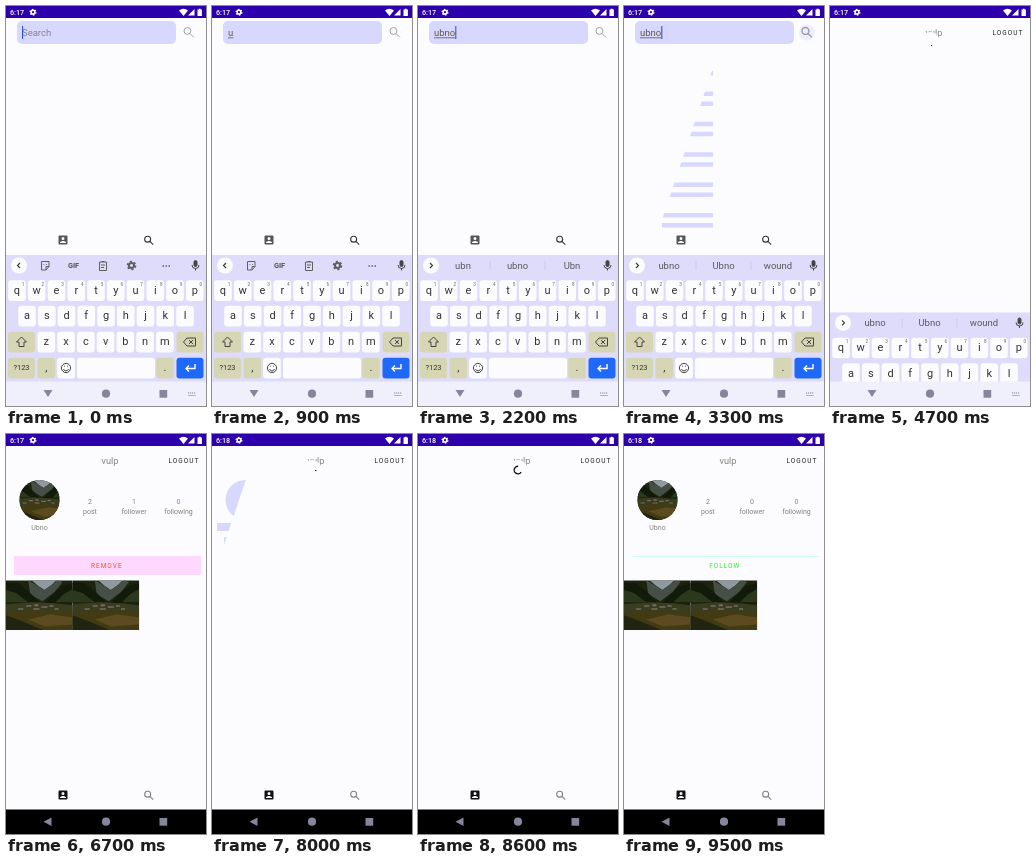
An HTML page for the animation above (9.6 s loop, 200 by 400 pixels).

```html
<!DOCTYPE html>
<html lang="en">
<head>
<meta charset="utf-8">
<title>Profile search</title>
<style>
  html, body { margin: 0; width: 100%; height: 100%; overflow: hidden; background: #fcfcff; }
  svg { display: block; width: 100%; height: 100%; }
  text { font-family: Roboto, "Noto Sans", sans-serif; }
  .mid { text-anchor: middle; }
  .info { font-size: 7px; fill: #85837c; text-anchor: middle; }
  .caps { font-size: 6.5px; letter-spacing: 1px; }
  .key { font-size: 11px; fill: #333; text-anchor: middle; }
  .digit { font-size: 4.6px; fill: #666; text-anchor: middle; }
  .word { font-size: 9.5px; fill: #5c5860; text-anchor: middle; }
  .line { fill: none; stroke: currentColor; }
</style>
</head>
<body>
<svg viewBox="0 0 200 400" preserveAspectRatio="none">
  <defs>
    <symbol id="lens" viewBox="0 0 24 24">
      <circle class="line" cx="9.5" cy="9.5" r="5.5"/><path class="line" d="M13.7 13.7l6 6"/>
    </symbol>
    <symbol id="account" viewBox="0 0 24 24">
      <path fill="currentColor" fill-rule="evenodd" d="M3 5a2 2 0 0 1 2-2h14a2 2 0 0 1 2 2v14a2 2 0 0 1-2 2H5a2 2 0 0 1-2-2zM15 9a3 3 0 1 0-6 0 3 3 0 0 0 6 0zM6 17v1h12v-1c0-2-4-3.1-6-3.1S6 15 6 17z"/>
    </symbol>
    <symbol id="gear" viewBox="0 0 24 24">
      <circle cx="12" cy="12" r="8.5" fill="none" stroke="currentColor" stroke-width="4" stroke-dasharray="4.45"/>
      <circle cx="12" cy="12" r="5.5" fill="none" stroke="currentColor" stroke-width="4.5"/>
    </symbol>
    <symbol id="photo" viewBox="0 0 66 50" preserveAspectRatio="xMidYMid slice">
      <path fill="#1c2410" d="M0 0h66v50H0z"/>
      <path fill="#9098a0" d="M25 0h25l-5 5-7 5-6-4z"/>
      <path fill="#454f45" d="M22 0l8 5 8 5 7-5 6-5 5 2-8 10-12 9-12-7z"/>
      <path fill="#121a0a" d="M0 2l12 1 12 10 9 9H0zM66 3l-11 3-10 9-7 8h28z"/>
      <path fill="#2c381c" d="M0 10l10 3 12 9H0zM66 9l-9 5-8 8h17z"/>
      <path fill="#3a3c20" d="M0 24l26-2 22 1 18 2v8H0z"/>
      <path fill="#766c60" d="M20 25h5v1.500h-5zM28 24h4v2h-4zM35 26h6v1.500h-6zM43 25h4v1.500h-4zM12 28h5v1.500h-5zM27 28h6v1.500h-6zM48 28h4v1.500h-4z"/>
      <path fill="#413a12" d="M0 33l24-3 42 2v18H0z"/>
      <path fill="#5c4a20" d="M22 39l22-5 22 3v7l-28 2z"/>
      <path fill="#202410" d="M0 35l14 5 24 10H0z"/>
    </symbol>
    <clipPath id="disc"><circle cx="33.5" cy="66" r="20"/></clipPath>
    <clipPath id="dot"><circle cx="22" cy="62" r="10"/></clipPath>
    <clipPath id="listShapes"></clipPath>
    <clipPath id="profileShapes"></clipPath>
  </defs>

  <rect width="200" height="400" fill="#fcfcff"/>

  <g id="searchPage">
    <rect x="11" y="15" width="159" height="23" rx="5" fill="#d8d8ff"/>
    <text id="hint" x="16" y="30" font-size="9.5" fill="#85838c">Search</text>
    <text id="query" x="16" y="30" font-size="9.5" fill="#605a48"></text>
    <path id="underline" stroke="#605a48" stroke-width=".8"/>
    <rect id="caret" y="20" width="1.1" height="13" fill="#3050e8"/>
    <circle id="tapGlow" cx="183" cy="26.5" r="8" fill="#e8e8ff"/>
    <use id="lensButton" href="#lens" x="175.5" y="19" width="15" height="15" color="#a0a0a8"/>
    <g clip-path="url(#listShapes)"><path class="band" fill="#d8d8ff"/></g>
    <g id="result">
      <g clip-path="url(#dot)"><use href="#photo" x="9" y="52" width="26" height="20"/></g>
      <text x="39" y="60" font-size="7" fill="#444">vulp</text>
      <text x="39" y="70" font-size="7" fill="#77746c">Ubno</text>
    </g>
  </g>

  <g id="profilePage">
    <text class="mid" x="104" y="30" font-size="9.2" fill="#85837c">vulp</text>
    <text class="caps" x="162.5" y="29.2" fill="#222">LOGOUT</text>
    <g clip-path="url(#profileShapes)"><path class="band" fill="#d8d8ff"/></g>
    <g id="spinner">
      <circle cx="100" cy="36" r="10" fill="#fcfcff"/>
      <circle id="arc" cx="100" cy="36" r="3.8" fill="none" stroke="#111" stroke-width="1.4" pathLength="360"/>
    </g>
    <g id="profile">
      <g clip-path="url(#disc)"><use href="#photo" x="7" y="46" width="53" height="40"/></g>
      <text class="info" x="33.5" y="95.7">Ubno</text>
      <text class="info" x="84" y="70">2</text><text class="info" x="84" y="79.5">post</text>
      <text class="info" id="followers" x="128" y="70"></text><text class="info" x="128" y="79.5">follower</text>
      <text class="info" x="172.5" y="70">0</text><text class="info" x="172.5" y="79.5">following</text>
      <path id="border" d="M8 122.5h187" stroke-width=".8"/>
      <rect id="press" x="8" y="122" width="187" height="19" rx="1" fill="#ffd8ff"/>
      <text class="caps mid" id="action" x="100.8" y="134"></text>
      <use href="#photo" x="0" y="146.5" width="66.7" height="49.5"/>
      <use href="#photo" x="66.5" y="146.5" width="66.7" height="49.5"/>
    </g>
  </g>

  <g id="tabs">
    <use id="accountTab" href="#account" x="51" y="355" width="12" height="12"/>
    <use id="lensTab" href="#lens" x="136.5" y="355" width="13" height="13" stroke-width="2"/>
  </g>

  <g id="keyboard">
    <rect y="249" width="200" height="128" fill="#dedcfa"/>
    <circle cx="13" cy="259.5" r="8" fill="#fcfcff"/>
    <path id="chevron" fill="none" stroke="#333" stroke-width="1.1"/>
    <g id="tools" color="#606060" fill="none" stroke="#606060">
      <path d="M35.5 255.5h7.5v5l-3 3.5h-4.5zM43 260.5h-3v3.5M37.5 258.5h.8M40.2 258.5h.8"/>
      <text class="mid" x="67.5" y="262.4" font-size="7.3" font-weight="700" fill="#505050" stroke="none">GIF</text>
      <path d="M93.5 256h7v8.5h-7zM95.5 255.5h3M95 259h4M95 261.5h3"/>
      <use href="#gear" x="120" y="254" width="11" height="11" stroke="none"/>
      <path d="M156.500 260h1.5m1.5 0H161m1.5 0H164" stroke-width="1.6"/>
    </g>
    <g id="words">
      <text class="word" x="45" y="263"></text><text class="word" x="99.5" y="263"></text><text class="word" x="154" y="263"></text>
      <path d="M72 255v9M127 255v9" stroke="#c4c4e4" stroke-width=".7"/>
    </g>
    <g fill="none" stroke="#444">
      <rect x="188" y="254.5" width="3" height="6" rx="1.5" fill="#444"/>
      <path d="M186 259a3.5 3.5 0 0 0 7 0M189.5 262.5v2"/>
    </g>
    <g id="keys"></g>
    <g fill="none" stroke="#444">
      <path d="M15.5 331l5 5h-2.5v4.5h-5V336h-2.5z"/>
      <path d="M181 332h8.5v8H181l-3.5-4zM183 334l4 4m0-4l-4 4"/>
      <circle cx="60" cy="362" r="4.6"/><path d="M57.5 363a2.6 2.6 0 0 0 5 0M58 360.2h.9M61.1 360.2h.9"/>
      <path d="M189 358v4.5h-9m3-3l-3 3 3 3" stroke="#fff" stroke-width="1.4"/>
    </g>
  </g>

  <g fill="#85859c">
    <rect id="navBar" y="375.5" width="200" height="24.5"/>
    <path id="back"/>
    <circle cx="100" cy="387.7" r="4.1"/><rect x="153.5" y="384" width="7.7" height="7.7"/>
    <path id="switcher" d="M182 387h8M182.5 389.5h7" stroke="#85859c" stroke-width="1.2" stroke-dasharray="1.2 .8"/>
  </g>

  <g fill="#fff" color="#fff">
    <rect width="200" height="12" fill="#2d00ac"/>
    <text id="clock" x="4" y="9" font-size="7.2" font-weight="500"></text>
    <use href="#gear" x="23" y="2.2" width="8" height="8"/>
    <path d="M173 4.5q4.5-3.5 9 0l-4.5 5.5zM182 9.5h6.5V3zM191.5 3.5h1.2v-.8h2v.8h1.2v6.5h-4.4z"/>
  </g>
</svg>
<script>
const LOOP = 9600;
const $ = id => document.getElementById(id);
const clamp = v => Math.max(0, Math.min(1, v));
const ramp = (t, from, to) => clamp((t - from) / (to - from));
const show = (id, on) => { $(id).style.display = on ? '' : 'none'; };
const write = (id, text) => { if ($(id).textContent !== text) $(id).textContent = text; };
const set = (id, attrs) => { for (const k in attrs) $(id).setAttribute(k, attrs[k]); };

function add(parent, tag, attrs, text = '') {
  const el = document.createElementNS('http://www.w3.org/2000/svg', tag);
  for (const k in attrs) el.setAttribute(k, attrs[k]);
  el.textContent = text;
  parent.append(el);
}
const bar = (id, x, y, width, height) => add($(id), 'rect', { x, y, width, height });

// Loading placeholders
for (let i = 0; i < 6; i++) {
  const y = 55 + i * 30.4;
  add($('listShapes'), 'circle', { cx: 22, cy: y + 7, r: 10 });
  bar('listShapes', 38, y, 51, 4.5);
  bar('listShapes', 38, y + 10, 51, 4.5);
}
add($('profileShapes'), 'circle', { cx: 33.5, cy: 66, r: 20 });
bar('profileShapes', 5, 89, 57, 8);
for (const x of [64, 108, 152]) bar('profileShapes', x, 62, 43, 20);
bar('profileShapes', 12, 103, 177, 14);
bar('profileShapes', 8, 122, 187, 19);

// Keyboard
const PALE = '#fcfcff', TAN = '#d6d6b4', PITCH = 19.75;
function key(cx, cy, label = '', width = 17.6, fill = PALE, size = 11) {
  add($('keys'), 'rect', { x: cx - width / 2, y: cy - 9.7, width, height: 20.6, rx: 3, fill });
  add($('keys'), 'text', { class: 'key', x: cx, y: cy + size * .34, style: `font-size:${size}px` }, label);
}
[['qwertyuiop', 11, 284], ['asdfghjkl', 21, 309.5], ['zxcvbnm', 40.3, 335.5]].forEach(([row, x, y]) =>
  [...row].forEach((c, i) => key(x + i * PITCH, y, c)));
[...'1234567890'].forEach((c, i) => add($('keys'), 'text', { class: 'digit', x: 17 + i * PITCH, y: 279.5 }, c));
key(15.5, 335.5, '', 27, TAN);
key(184, 335.5, '', 27, TAN);
key(15.5, 361.5, '?123', 27, TAN, 7.5);
key(40.3, 361.5, ',', 17.6, TAN);
key(60, 361.5);
key(110, 361.5, '', 78);
key(159, 361.5, '.', 17.6, TAN);
key(184, 361.5, '', 27, '#2068f8');

const TYPING = [[0, ''], [900, 'u'], [1300, 'ub'], [1700, 'ubn'], [2150, 'ubno']];
const HINTS = [[0], [1000, 'u', 'up', 'us'], [1400, 'ub', 'up', 'Ub'],
  [1800, 'ubn', 'ubno', 'Ubn'], [2300, 'ubno', 'Ubno', 'wound']];
const latest = (steps, t) => steps.filter(s => s[0] <= t).pop();

// Each load lasts one sweep of the slanted shimmer
const LOADS = [2820, 4711, 7750], SWEEP = 1000, SLANT = .335;
const OPEN = 4700;

function drawShimmer(t) {
  const start = LOADS.find(s => t >= s && t < s + SWEEP);
  const p = start === undefined ? -1 : (t - start) / SWEEP;
  const x = -227 + 654 * p;
  const top = x + 200 * SLANT, bottom = x - 200 * SLANT;
  const d = p < 0 ? '' : `M${top - 45} 0H${top + 45}L${bottom + 45} 400H${bottom - 45}z`;
  document.querySelectorAll('.band').forEach(b => b.setAttribute('d', d));
  return p;
}

function drawSearch(t) {
  const query = latest(TYPING, t)[1];
  write('query', query);
  show('hint', !query);
  const end = 16 + (query ? $('query').getComputedTextLength() : 0);
  set('underline', { d: query ? `M16 31.8H${end}` : '' });
  set('caret', { x: end });
  show('caret', t % 1000 < 500);
  const glow = ramp(t, 2750, 2900) * (1 - ramp(t, 3250, 3500));
  set('tapGlow', { opacity: glow });
  set('lensButton', { 'stroke-width': 1.6 + glow });
  show('result', t >= LOADS[0] + SWEEP);

  const words = latest(HINTS, t).slice(1);
  show('tools', !words.length);
  show('words', words.length);
  set('chevron', { d: words.length ? 'M12 257l2.5 2.5-2.5 2.5' : 'M14 257l-2.5 2.5 2.5 2.5' });
  document.querySelectorAll('.word').forEach((el, i) => { el.textContent = words[i] || ''; });
}

function drawProfile(t, p) {
  const loading = p >= 0 || t < LOADS[1];
  const followed = t < LOADS[2];
  show('profile', !loading);
  show('spinner', loading);
  const sweep = Math.max(15, 15 + (p - .25) * 370);
  const middle = 8 + (p - .25) * 242;
  set('arc', { 'stroke-dasharray': `${sweep} ${360 - sweep}`, transform: `rotate(${middle - sweep / 2} 100 36)` });
  write('followers', followed ? '1' : '0');
  write('action', followed ? 'REMOVE' : 'FOLLOW');
  set('action', { fill: followed ? '#f05020' : '#28f028' });
  set('border', { stroke: followed ? '#ffd8ff' : '#c8fff0' });
  set('press', { opacity: ramp(t, 6450, 6650) * (1 - ramp(t, 7200, 7550)) });
}

function draw(t) {
  const profile = t >= OPEN;
  const p = drawShimmer(t);
  show('searchPage', !profile);
  show('profilePage', profile);
  if (profile) drawProfile(t, p); else drawSearch(t);

  const slide = ramp(t, 4500, 4800), typing = slide < 1;
  show('keyboard', typing);
  set('keyboard', { transform: `translate(0 ${128 * slide * slide})` });
  set('tabs', { transform: `translate(0 ${slide > 0 ? 0 : -127})` });
  set('accountTab', { color: profile ? '#111' : '#555' });
  set('lensTab', { color: profile ? '#808080' : '#333' });
  set('navBar', { fill: typing ? '#f0f0fc' : '#000' });
  set('back', { d: typing ? 'M37.5 384h9l-4.5 7z' : 'M45.5 383.5v8.5l-8-4.25z' });
  show('switcher', typing);
  write('clock', t < 7100 ? '6:17' : '6:18');
}

const began = performance.now();
function tick() {
  draw((performance.now() - began) % LOOP);
  requestAnimationFrame(tick);
}
tick();
</script>
</body>
</html>
```
